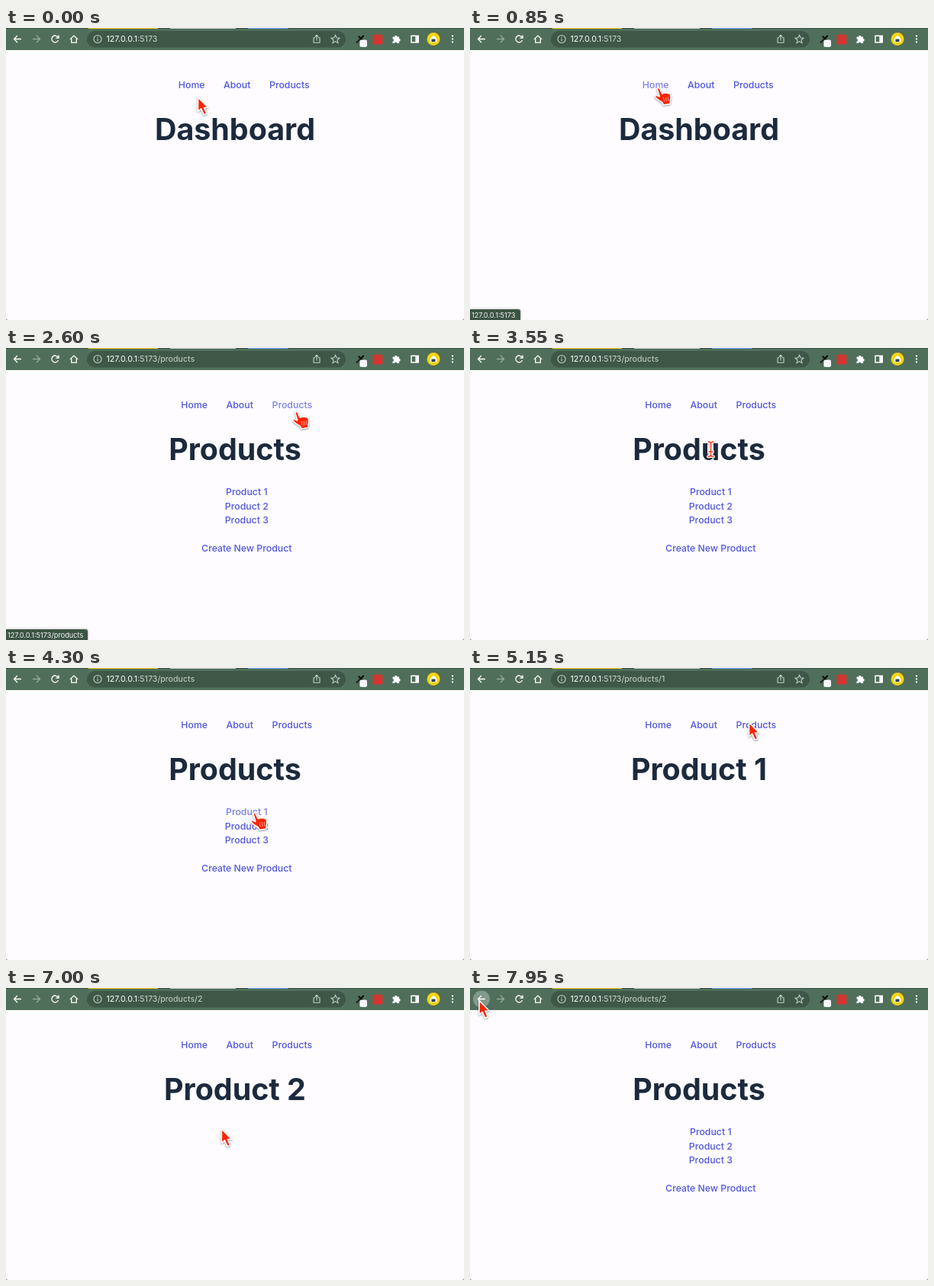
An HTML page that plays this animation: 600 by 383 pixels, repeating every 8000 ms.

```html
<!DOCTYPE html>
<html lang="en">
<head>
<meta charset="utf-8">
<title>Dashboard</title>
<style>
html, body { margin: 0; width: 100%; height: 100%; overflow: hidden; background: #fefcfe; }
svg { position: absolute; left: 0; top: 0; }
text { font-family: Inter, sans-serif; }
.link { font-size: 12.3px; font-weight: 500; fill: #5156df; }
.link.hover { fill: #7b80ea; }
.mid { text-anchor: middle; }
#title { font-size: 39.4px; font-weight: 700; fill: #1c2a3d; }
#url { font-size: 10.7px; fill: #fff; }
#rest { fill: #cbd6ce; }
.icon { fill: none; stroke: #fff; stroke-width: 1.3; }
.soft { stroke: #c3d0c6; stroke-width: 1.1; }
#status {
  position: absolute; left: 0; bottom: 0; height: 14px; padding: 0 6px 0 2px;
  border-radius: 0 3px 0 0; background: #3c5444; color: #f1f5f2;
  box-shadow: 0 0 3px rgba(0, 0, 0, .45);
  font: 9.2px/16px Inter, sans-serif; white-space: nowrap;
}
#cursor { filter: drop-shadow(0 1px 1.2px rgba(0, 0, 0, .4)); }
#cursor path { fill: #fa2406; stroke: #fff; stroke-width: 1.6; stroke-linejoin: round; }
#cursor .ibeam { fill: none; stroke-width: 4; stroke-linecap: round; }
#cursor .core { stroke: #f0442a; stroke-width: 1.5; }
#cursor .crease { fill: none; stroke: #ffc8bd; stroke-width: .8; }
</style>
</head>
<body>
<svg width="600" height="383" viewBox="0 0 600 383">
  <rect width="600" height="28.5" fill="#506f5a"/>
  <rect width="600" height="1" fill="#3c5444"/>
  <path d="M0 28.5H600" stroke="#48624f" stroke-width=".8"/>
  <path d="M108 .5h91" stroke="#f2cb22"/>
  <path d="M215 .5h86" stroke="#c9ccca"/>
  <path d="M317 .5h52" stroke="#6f9df0"/>
  <rect x="106" y="4" width="339" height="21.5" rx="10.75" fill="#3e5747"/>

  <circle id="halo" cx="15" cy="14.5" r="11" fill="#829a89"/>
  <path class="icon" d="M20 14.5H11M15 10l-4.5 4.5L15 19"/>
  <path class="icon" stroke-opacity=".4" d="M35 14.5h9M40 10l4.500 4.500L40 19"/>
  <path class="icon" d="M68.300 12.500a4.400 4.400 0 1 0 .2 3.400M69 9.500v3.700h-3.700"/>
  <path class="icon" d="M84 14.800l5-4.700 5 4.700M85.700 13.800v5.400h6.600v-5.400"/>
  <g class="icon soft">
    <circle cx="120" cy="14.500" r="5"/>
    <path d="M120 13.700v3.600M120 11.300v1.200"/>
    <path d="M405 12.700h-2v6.600h8v-6.600h-2M407 16.500V9.500M404.800 11.500l2.200-2.200 2.200 2.200"/>
    <path d="M431.500 9.300l1.600 3.500 3.800.4-2.900 2.600.9 3.800-3.400-2-3.400 2 .9-3.800-2.900-2.600 3.800-.4z"/>
  </g>
  <path d="M459 19.500l6-6" stroke="#1b211d" stroke-width="2"/>
  <path d="M462.500 11.500l4.500 4.500M465 13.500l3-3" stroke="#111" stroke-width="2.400" stroke-linecap="round"/>
  <rect x="463.500" y="15.500" width="9.500" height="9.500" rx="2" fill="#fafafa"/>
  <rect x="480.500" y="8.500" width="13" height="13" rx="2" fill="#d3362f"/>
  <path d="M506.500 11.500h2.500a1.700 1.700 0 1 1 3.400 0h2.600v2.600a1.700 1.700 0 1 1 0 3.400v2.600h-2.700a1.600 1.600 0 0 0-3.200 0h-2.600v-2.700a1.600 1.600 0 0 0 0-3.200z" fill="#fff"/>
  <rect x="531" y="10.300" width="9.200" height="8.600" fill="none" stroke="#fff" stroke-width="1.500"/>
  <path d="M536.300 10.300h4v8.600h-4z" fill="#fff"/>
  <circle cx="560" cy="14.500" r="8.500" fill="#f7d20d"/>
  <path d="M555.500 15l2-3.500q2.500-2.500 5 0l2 3.500v3.500h-9z" fill="#fff"/>
  <path d="M557.500 14.500h5v3.500h-5z" fill="#38424a"/>
  <g fill="#fff"><circle cx="585" cy="10.500" r="1.150"/><circle cx="585" cy="14.500" r="1.150"/><circle cx="585" cy="18.500" r="1.150"/></g>

  <text id="url" x="131.500" y="18.300">127.0.0.1<tspan id="rest"></tspan></text>

  <g id="nav">
    <text class="link" x="229.300" y="79.300">Home</text>
    <text class="link" x="288.500" y="79.300">About</text>
    <text class="link" x="348.500" y="79.300">Products</text>
  </g>
  <text id="title" class="mid" x="300" y="146.500"></text>
  <g id="list">
    <text class="link mid" x="315.300" y="193.300">Product 1</text>
    <text class="link mid" x="315.300" y="211.800">Product 2</text>
    <text class="link mid" x="315.300" y="230.300">Product 3</text>
    <text class="link mid" x="315.300" y="267">Create New Product</text>
  </g>
  <path d="M0 380.500V383H2.500Q.5 382.500 0 380.500M600 380.500V383h-2.500q2-.5 2.500-2.500" fill="#8b938d"/>
</svg>
<div id="status"></div>
<svg width="600" height="383" viewBox="0 0 600 383">
  <g id="cursor">
    <path data-kind="arrow" d="M0 0V18.500L4.200 14.800 7.600 22.800 11.300 21.200 8 13.500H13.300Z"/>
    <g data-kind="hand">
      <path d="M.2 1.600Q1.200-.6 3.200 1L6.600 8.200 8.800 7.300 11 7.300 13 7 15.200 7.800 17.300 8.500Q18.800 13 17.500 17L17.300 21.500 8.500 23 6.800 19.500Q1.500 17-2.600 12.500-3.200 9.600.2 10.800L3.200 12Z"/>
      <path class="crease" d="M8.500 13l1 5.500M11.600 12.700l.6 5.500M14.600 12.500l.2 5.300"/>
    </g>
    <g data-kind="ibeam">
      <path class="ibeam" d="M-3.500-9.500Q0-9.500 0-7V7.500Q0 10-3.500 10M3.500-9.500Q0-9.500 0-7M0 7.500Q0 10 3.500 10M-2.500 3.500h5"/>
      <path class="ibeam core" d="M-3.500-9.500Q0-9.500 0-7V7.500Q0 10-3.500 10M3.500-9.500Q0-9.500 0-7M0 7.500Q0 10 3.500 10M-2.500 3.500h5"/>
    </g>
  </g>
</svg>
<script>
const LOOP = 8000;
const HOST = '127.0.0.1';
const $ = id => document.getElementById(id);
const links = [...document.querySelectorAll('.link')];
const kinds = [...document.querySelectorAll('[data-kind]')];

// Each track lists [start ms, value]; values change abruptly.
const tracks = {
  title: [[0, 'Dashboard'], [1450, 'About'], [2450, 'Products'], [4650, 'Product 1'],
          [5550, 'Products'], [6450, 'Product 2'], [7900, 'Products']],
  path: [[0, ''], [1450, '/about'], [2450, '/products'], [4650, '/products/1'],
         [5550, '/products'], [6450, '/products/2']],
  status: [[0, null], [300, ''], [1100, '/about'], [2150, '/products'], [3500, null],
           [4350, '/products/1'], [5150, null], [5250, '/products'],
           [6200, '/products/2'], [6950, null]],
  hover: [[0, ''], [300, 'Home'], [950, ''], [1100, 'About'], [1950, ''], [2150, 'Products'],
          [3100, ''], [4200, 'Product 1'], [4650, ''], [5200, 'Products'], [5750, ''],
          [6150, 'Product 2'], [6450, '']],
  kind: [[0, 'arrow'], [300, 'hand'], [1000, 'arrow'], [1100, 'hand'], [2000, 'arrow'],
         [2150, 'hand'], [3150, 'arrow'], [3350, 'ibeam'], [3750, 'arrow'], [4200, 'hand'],
         [4750, 'arrow'], [5200, 'hand'], [5800, 'arrow'], [6150, 'hand'], [6550, 'arrow']],
  halo: [[0, false], [7600, true]]
};

// Pointer stops: [ms, x, y]
const stops = [
  [0, 251.5, 91], [100, 251.5, 91], [500, 245, 78], [850, 245, 78],
  [1250, 306.5, 83.5], [1800, 306.5, 83.5], [2250, 378.5, 83], [2950, 378.5, 83],
  [3500, 315.5, 132.5], [3600, 315.5, 132.5], [4400, 324, 192], [4600, 324, 192],
  [5150, 365.5, 71.5], [5350, 370, 80], [5600, 370, 80], [6200, 326.5, 213],
  [6800, 326.5, 213], [7650, 14, 15], [7700, 14, 15], [7950, 12, 16.5], [8000, 12, 16.5]
];

const at = (track, t) => track.findLast(([start]) => start <= t)[1];
const ease = p => p * p * (3 - 2 * p);

function pointer(t) {
  const i = stops.findIndex(([end]) => end > t);
  const [t0, x0, y0] = stops[i - 1];
  const [t1, x1, y1] = stops[i];
  const p = ease((t - t0) / (t1 - t0));
  return [x0 + (x1 - x0) * p, y0 + (y1 - y0) * p];
}

const show = (el, on) => { el.style.display = on ? '' : 'none'; };

function draw(t) {
  const now = {};
  for (const key in tracks) now[key] = at(tracks[key], t);

  $('title').textContent = now.title;
  $('rest').textContent = ':5173' + now.path;
  $('nav').setAttribute('transform', `translate(${now.title === 'Dashboard' ? -3.5 : 0} 0)`);
  show($('list'), now.title === 'Products');
  show($('halo'), now.halo);
  show($('status'), now.status !== null);
  $('status').textContent = HOST + ':5173' + (now.status || '');
  links.forEach(el => el.classList.toggle('hover', el.textContent === now.hover));
  kinds.forEach(el => show(el, el.dataset.kind === now.kind));
  $('cursor').setAttribute('transform', `translate(${pointer(t).join(' ')})`);
}

function tick() {
  draw(performance.now() % LOOP);
  requestAnimationFrame(tick);
}
tick();
</script>
</body>
</html>
```
